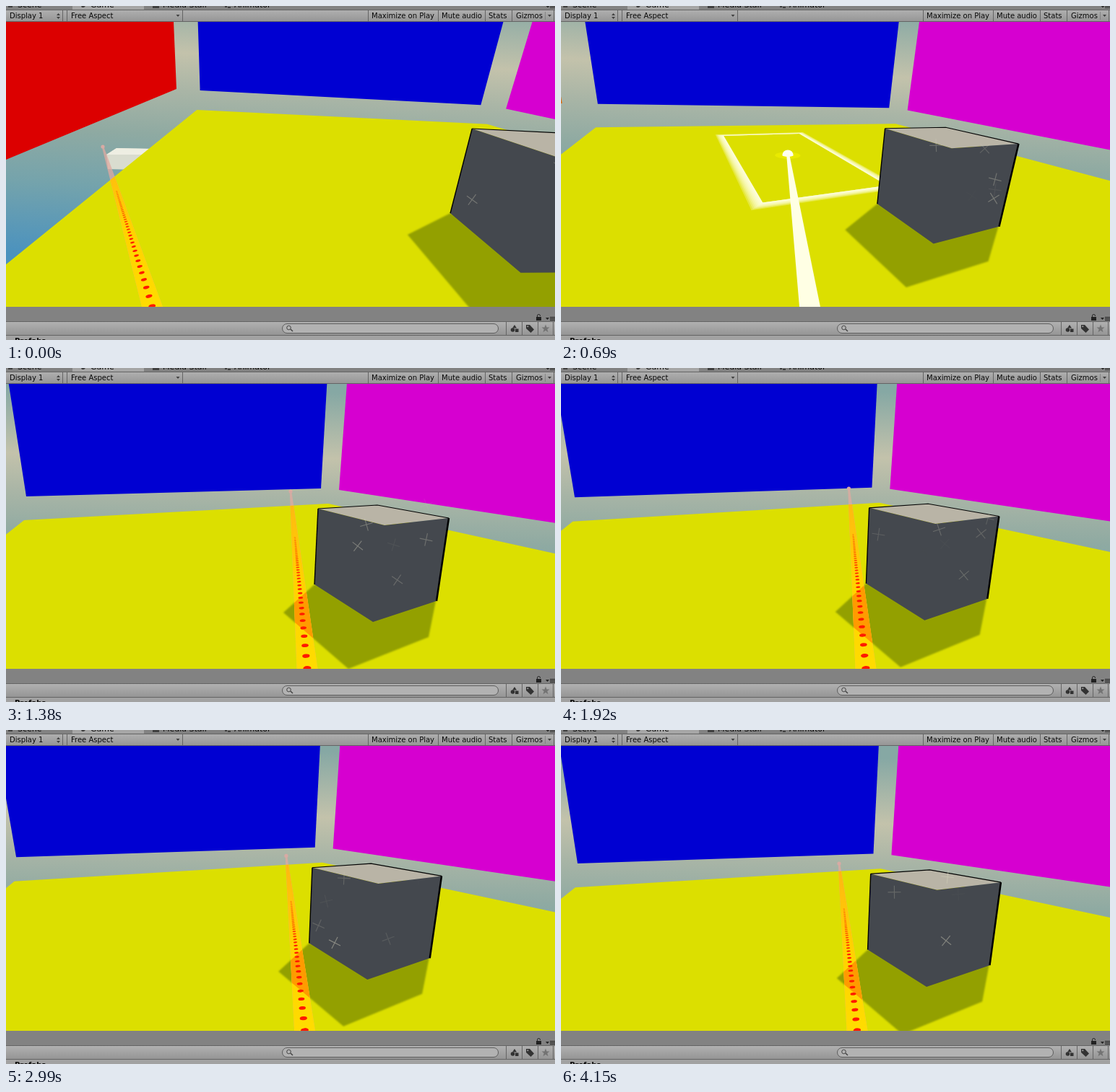
An HTML page with a canvas for the animation above (4.22 s loop, 760 px wide and 463 px high).

```html
<!DOCTYPE html>
<html lang="en">
<head>
<meta charset="utf-8">
<title>Pointer in a coloured room</title>
<style>
  html, body { margin: 0; width: 760px; height: 463px; overflow: hidden; background: #a2a2a2; }
  canvas, svg { position: absolute; left: 0; top: 0; display: block; }
  canvas { top: 22px; }
  text { font-family: "DejaVu Sans", sans-serif; font-size: 10px; fill: #080808; }
  .tab { font-size: 11px; }
  .line { stroke: #646464; stroke-width: 1; fill: none; }
</style>
</head>
<body>
<canvas id="view" width="760" height="395"></canvas>
<svg width="760" height="463" viewBox="0 0 760 463">
  <defs>
    <linearGradient id="bar" x1="0" y1="0" x2="0" y2="1">
      <stop offset="0" stop-color="#b0b0b0"/><stop offset="1" stop-color="#959595"/>
    </linearGradient>
  </defs>

  <!-- tabs and game toolbar -->
  <rect width="760" height="6" fill="#828282"/>
  <rect x="92" width="99" height="6" fill="#a6a6a6"/>
  <text class="tab" x="16" y="2">Scene</text>
  <text class="tab" x="117" y="2">Game</text>
  <text class="tab" x="217" y="2">Media Stall</text>
  <text class="tab" x="316" y="2">Animator</text>
  <path d="M3 0h6v2h-6zM104 0h6l-2 2h-3zM203 0h9v3h-9zM303 0h3v2h-3zM307 1h4v2h-4z" fill="#404040"/>
  <path d="M748 0l4 0l-2 2zM753 .5h7M753 2.5h7" fill="#303030" stroke="#303030"/>
  <rect y="5" width="760" height="17" fill="url(#bar)"/>
  <path class="line" d="M0 5.5H760M0 21.5H760M78.5 6V21M84.5 6V21M244.5 6V21M501.5 6V21M598.5 6V21M663.5 6V21M700.5 6V21M758.5 6V21"/>
  <text x="5" y="17">Display 1</text>
  <text x="90" y="17">Free Aspect</text>
  <text x="506" y="17">Maximize on Play</text>
  <text x="603" y="17">Mute audio</text>
  <text x="668" y="17">Stats</text>
  <text x="706" y="17">Gizmos</text>
  <path d="M70 13l2.5-3l2.500 3zM70 15l2.5 3l2.500-3zM235.5 12h5l-2.5 3zM750 12h5l-2.5 3z" fill="#404040"/>
  <path class="line" d="M746.5 8V19" opacity=".5"/>

  <!-- lower panel -->
  <rect y="417" width="760" height="21" fill="#828282"/>
  <rect y="438" width="760" height="18" fill="url(#bar)"/>
  <rect y="456" width="760" height="7" fill="#a2a2a2"/>
  <path class="line" d="M0 437.5H760M0 456.5H760M692.5 438V456M714.5 438V456M736.5 438V456M757.5 438V456"/>
  <rect x="382.5" y="440.5" width="299" height="13" rx="6.5" fill="#b2b2b2" stroke="#5c5c5c"/>
  <path d="M394 448l3 3" stroke="#444" stroke-width="1.5"/>
  <circle cx="391.5" cy="446" r="2.8" fill="none" stroke="#444"/>
  <path d="M734 431h7v5h-7z" fill="#222"/>
  <path d="M735.5 431v-1.500a2 2 0 0 1 4 0V430" fill="none" stroke="#222"/>
  <path d="M747 432h5l-2.5 3z" fill="#222"/>
  <path d="M753 431.5h7M753 433.5h7M753 435.5h7" stroke="#222"/>
  <g fill="#333">
    <circle cx="701.5" cy="449" r="2.8"/>
    <path d="M704 442l3 4.500h-6zM705 447.5h4.500v4.500h-4.500z"/>
    <path d="M720 442h5l6 6.500l-4.500 4.500l-6.500-6z"/>
    <path d="M747 441.5l1.500 4h4l-3.200 2.600l1.200 4.200l-3.500-2.500l-3.500 2.500l1.200-4.200l-3.200-2.600h4z" fill="#737373"/>
  </g>
  <circle cx="722.3" cy="444.3" r="1" fill="#aaa"/>
  <text x="12" y="468" font-weight="bold">Prefabs</text>
</svg>

<script>
const LOOP = 4220, STEP = 76.86, LAST = 54;
const FOCAL = 430, CX = 380, CY = 219.5, BOTTOM = 417;
const ctx = document.getElementById('view').getContext('2d');

// Step, then where three things are seen: a wall corner and a box corner,
// which pin the head's rotation, and the pointer (tip x, tip y, lower x).
const keys = [
  [0, 265, 115, 718, 373, 134, 195, 202.5],
  [4, 131, 117, 572, 338, 211, 212, 254.5],
  [9, 49, 135, 517, 330, 314, 205, 344.5],
  [18, 28, 178, 508, 352, 394, 171, 417],
  [33, 13, 174, 500, 344, 389, 170, 414.5],
  [45, 18, 180, 502, 350, 387, 180, 412.5],
  [54, 23, 185, 506, 356, 385, 185, 410],
];

// Smooth curve through the keys.
function curve(n) {
  let i = 0;
  while (i < keys.length - 2 && n >= keys[i + 1][0]) i++;
  const h = keys[i + 1][0] - keys[i][0], u = (n - keys[i][0]) / h;
  const slope = (k, j) => {
    const a = keys[Math.max(k - 1, 0)], b = keys[Math.min(k + 1, keys.length - 1)];
    return (b[j] - a[j]) / (b[0] - a[0]) * h;
  };
  return keys[i].map((p, j) => {
    const q = keys[i + 1][j], m = slope(i, j), w = slope(i + 1, j);
    return p + u * (m + u * (3 * (q - p) - 2 * m - w + u * (2 * (p - q) + m + w)));
  });
}

// Vectors
const add = (a, b, s = 1) => a.map((v, i) => v + s * b[i]);
const scale = (a, s) => a.map(v => v * s);
const dot = (a, b) => a.reduce((sum, v, i) => sum + v * b[i], 0);
const unit = a => scale(a, 1 / Math.sqrt(dot(a, a)));
const cross = (a, b) => [0, 1, 2].map(i =>
  a[(i + 1) % 3] * b[(i + 2) % 3] - a[(i + 2) % 3] * b[(i + 1) % 3]);

// Camera: room axes as seen from the head, from the two pinned corners.
const ray = (x, y) => [x - CX, y - CY, FOCAL];
function lookFrom([, ax, ay, bx, by]) {
  const a = unit(ray(ax, ay)), b = unit(ray(bx, by));
  const mid = unit(add(a, b)), side = unit(add(b, a, -1));
  return [mid, side, cross(mid, side)];
}
const toRoom = (look, x, y) => look.map(axis => dot(axis, ray(x, y)));
function toScreen(look, p) {
  const v = look.reduce((sum, axis, i) => add(sum, axis, p[i]), [0, 0, 0]);
  const s = FOCAL / Math.max(v[2], 1e-3);
  return [CX + v[0] * s, CY + v[1] * s];
}
// Room directions of screen points, as seen at one of the keys.
function seen(key, ...xy) {
  const look = lookFrom(keys[key]), out = [];
  for (let i = 0; i < xy.length; i += 2) out.push(toRoom(look, xy[i], xy[i + 1]));
  return out;
}

const room = {
  sky: seen(1, 150, 62, 600, 98),
  red: seen(0, -60, -60, 228.5, -60, 236, 115, -60, 238),
  blue: seen(3, -9, -60, 28, 178, 436, 167, 449, -60),
  pink: seen(3, 478, -60, 461, 169, 900, 236, 900, -60),
  floor: [...seen(3, 25, 211, 446, 188, 900, 288, 900, 600), ...seen(0, -60, 700, -60, 407)],
  block: seen(0, 139, 206, 153, 197, 202, 198, 194, 206, 180, 227, 141, 226),
  shade: seen(3, 427, 300, 384, 339, 474, 417, 585, 373, 595, 323),
  box: seen(3, 432, 195, 514, 190, 613, 208, 524, 218, 427, 300, 508, 352, 596, 323),
};
// Vanishing points of the floor's two directions.
const [ahead, right] = seen(1, 238, 69, 1450, 188).map(unit);
const down = unit(cross(ahead, right));
const onFloor = d => scale(d, 1 / dot(d, down));

// Sparks: peak step, offset from the box corner, opacity, angle.
let seed = 7;
const rnd = () => (seed = seed * 16807 % 2147483647) / 2147483647;
const sparks = Array.from({ length: 44 }, (_, i) =>
  [i * LAST / 43, rnd() * 165, rnd() * 120 - 12, .2 + rnd() * .45, rnd() * 3]);

function trace(pts) {
  pts.forEach(([x, y], i) => ctx[i ? 'lineTo' : 'moveTo'](x, y));
  ctx.closePath();
}
function poly(pts, color) {
  ctx.beginPath();
  trace(pts);
  ctx.fillStyle = color;
  ctx.fill();
}
function inside(area, paint) {
  ctx.save();
  ctx.beginPath();
  trace(area);
  ctx.clip();
  paint();
  ctx.restore();
}
function oval(x, y, rx, ry, color, turn = 0, from = 0) {
  ctx.beginPath();
  ctx.ellipse(x, y, rx, ry, turn, from, 2 * Math.PI);
  ctx.fillStyle = color;
  ctx.fill();
}
function edge(width, ...pts) {
  ctx.beginPath();
  pts.forEach(([x, y]) => ctx.lineTo(x, y));
  ctx.lineWidth = width;
  ctx.strokeStyle = '#000';
  ctx.stroke();
}

function drawSky([[x0, y0], [x1, y1]]) {
  const tilt = (y1 - y0) / (x1 - x0), mid = y0 + tilt * (CX - x0);
  const g = ctx.createLinearGradient(CX + 90 * tilt, mid - 90, CX - 290 * tilt, mid + 290);
  ['#86a8a4', '#c3c2ab', '#a9b5a6', '#8faaa2', '#74a3ac', '#4b92be'].forEach((c, i) =>
    g.addColorStop([0, .24, .38, .54, .74, 1][i], c));
  ctx.fillStyle = g;
  ctx.fillRect(0, 22, 760, 395);
}

// Landing area: a rectangle lying on the floor with a soft outer rim.
function drawLanding(look, x, y) {
  const centre = onFloor(toRoom(look, x, y + 2));
  const spot = (a, b) => toScreen(look, add(add(centre, right, a), ahead, b));
  const frame = m => [[-1, 1], [1, 1], [1, -1], [-1, -1]].map(([i, j]) =>
    spot(i * (.62 + m), j * (1.32 + m)));
  for (let j = 1; j <= 8; j++) {
    ctx.beginPath();
    trace(frame(0));
    trace(frame(.11 * j / 8));
    ctx.fillStyle = 'rgba(255,255,238,.25)';
    ctx.fill('evenodd');
  }
  const ring = Array.from({ length: 32 }, (_, i) => i * Math.PI / 16)
    .map(a => spot(.16 * Math.cos(a), .16 * Math.sin(a)));
  poly(ring, '#e9ea00');
  const r = .07 * dot(down, toRoom(look, x, y));
  oval(x, y + 2, r, r, '#fffff0', 0, Math.PI);
  oval(x, y + 2, r, r * .25, '#fffff0');
}

function drawBeam(x, y, base, landed, floor, shade) {
  const tip = landed ? 2 : 1.3;
  const shape = [[x - tip, y], [x + tip, y], [base + 14.5, BOTTOM], [base - 14.5, BOTTOM]];
  if (landed) return poly(shape, '#ffffe4');

  poly(shape, 'rgba(225,170,160,.75)');
  inside(floor, () => {
    const g = ctx.createLinearGradient(x, y, base, BOTTOM);
    g.addColorStop(0, '#ffb414');
    g.addColorStop(.5, '#ffd200');
    g.addColorStop(1, '#ffdc00');
    poly(shape, g);
  });
  inside(shade, () => poly(shape, '#ff9b00'));

  // Evenly spaced dots seen in perspective, the first on the lower edge.
  const run = (base - x) / (BOTTOM - y);
  for (let k = 0; k < 40; k++) {
    const d = 1 / (1 / (BOTTOM - 1 - y) + .0003 * k), s = d / 231;
    const alpha = Math.min(1, Math.max(0, (d - 35) / 90));
    oval(x + run * d, y + d, 5.2 * s, 2.7 * s ** 1.4, `rgba(255,26,0,${alpha})`, -run * .8);
  }
  oval(x, y, 2.6, 2.6, '#d8aaa4');
}

function drawBox([left, back, rightTop, front, leftLow, frontLow, rightLow]) {
  poly([left, back, rightTop, front], '#b9b4a6');
  poly([left, front, rightTop, rightLow, frontLow, leftLow], '#44484e');
  edge(1.2, left, back, rightTop);
  edge(1.4, left, leftLow);
  edge(2.5, rightTop, rightLow);
}

function drawSparks([x, y], n) {
  ctx.lineWidth = 1.2;
  for (const [at, dx, dy, alpha, angle] of sparks) {
    const glow = 1 - Math.abs(n - at) / 4;
    if (glow <= 0) continue;
    const a = angle + (n - at) * .06, c = 9 * Math.cos(a), s = 9 * Math.sin(a);
    ctx.strokeStyle = `rgba(215,212,190,${alpha * glow})`;
    ctx.beginPath();
    ctx.moveTo(x + dx - c, y + dy - s);
    ctx.lineTo(x + dx + c, y + dy + s);
    ctx.moveTo(x + dx + s, y + dy - c);
    ctx.lineTo(x + dx - s, y + dy + c);
    ctx.stroke();
  }
}

function draw(n) {
  const pose = curve(n), look = lookFrom(pose), [tipX, tipY, base] = pose.slice(5);
  const p = {};
  for (const name in room) p[name] = room[name].map(d => toScreen(look, d));

  ctx.setTransform(1, 0, 0, 1, 0, -22);
  drawSky(p.sky);
  poly(p.red, p.red[2][0] < 20 ? '#dc6400' : '#dc0000');
  poly(p.blue, '#0000d2');
  poly(p.pink, '#d600d0');
  poly(p.block, '#d9dccf');
  poly(p.block.slice(0, 4), '#eeeee2');
  poly(p.floor, '#dcdf00');
  const landed = ctx.isPointInPath(tipX, tipY - 22);
  if (landed) drawLanding(look, tipX, tipY);
  ctx.filter = 'blur(1.2px)';
  poly(p.shade, '#93a000');
  ctx.filter = 'none';
  drawBeam(tipX, tipY, base, landed, p.floor, p.shade);
  drawBox(p.box);
  drawSparks(p.box[0], n);
}

// Steps begin on whole hundredths of a second.
function stepAt(t) {
  let k = Math.floor(t / STEP);
  if (Math.floor((k + 1) * STEP / 10) * 10 <= t) k++;
  return Math.min(k, LAST);
}

const start = performance.now();
let shown = -1;
function tick() {
  const n = stepAt((performance.now() - start) % LOOP);
  if (n !== shown) draw(shown = n);
  requestAnimationFrame(tick);
}
tick();
</script>
</body>
</html>
```
